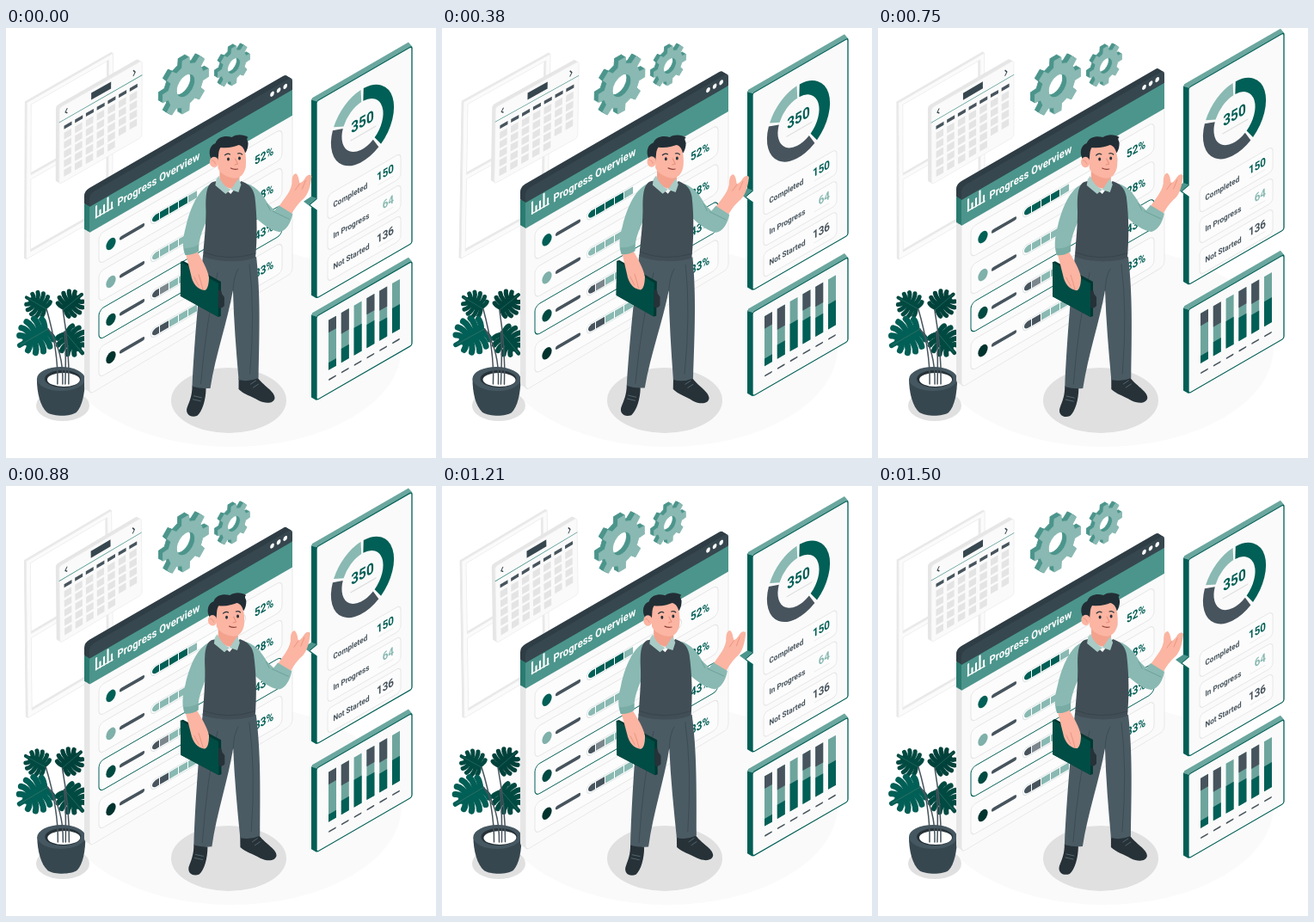
Write an HTML page that moves like this. It is 500 px wide and 500 px high and loops after 1540 ms.

```html
<!DOCTYPE html>
<html lang="en">
<head>
<meta charset="utf-8">
<title>Progress overview</title>
<style>
html, body { margin: 0; width: 100%; height: 100%; overflow: hidden; background: #fff; }
svg { display: block; width: 100%; height: 100%; }
text { font-family: Roboto, "Open Sans", sans-serif; font-weight: 600; }
</style>
</head>
<body>
<script>
const DEEP = '#005f56', MID = '#4c958c', PALE = '#89b9b2', SLATE = '#47545d', INK = '#37474f', SKIN = '#fbb5a2';
const SLANT = Math.tan(Math.PI / 6);
const LOOP = 1540;

// Basic shapes
const path = (d, fill, extra = '') => `<path d="${d}" fill="${fill}" ${extra}/>`;
const line = (d, color, w = 1, extra = '') =>
  `<path d="${d}" fill="none" stroke="${color}" stroke-width="${w}" stroke-linecap="round" stroke-linejoin="round" ${extra}/>`;
const oval = (x, y, rx, ry, fill) => `<ellipse cx="${x}" cy="${y}" rx="${rx}" ry="${ry}" fill="${fill}"/>`;
const rect = (x, y, w, h, fill, r = 0, extra = '') =>
  `<rect x="${x}" y="${y}" width="${w}" height="${h}" rx="${r}" fill="${fill}" ${extra}/>`;
const range = (n, f) => Array.from({ length: n }, (_, i) => f(i)).join('');

// Isometric wall: u runs right along the slope, v is the height at its left edge
const wall = (x, body) => `<g transform="matrix(1 ${-SLANT} 0 1 ${x} 0)">${body}</g>`;
const flat = (u, v, body) => `<g transform="translate(${u} ${v}) scale(.866 1)">${body}</g>`;
const label = (u, v, size, color, str, anchor = 'start') =>
  flat(u, v, `<text font-size="${size}" fill="${color}" text-anchor="${anchor}">${str}</text>`);
const depth = (n, layer) =>
  range(n, i => `<g transform="translate(${i - n} ${(i - n) * 7 / 6})">${layer}</g>`);

// Moving groups
const floating = (rise, body) => `<g data-rise="${rise}">${body}</g>`;
const swaying = (x, y, body) => `<g data-pivot="${x} ${y}">${body}</g>`;

function board() {
  const pane = (c, edge) => path('M0 87H100V269H0Z M5 92V174H95V92Z M5 179V263H95V179Z', c,
    `fill-rule="evenodd" stroke="${edge}" stroke-width=".8"`);
  return wall(24, depth(2, pane('#ececec', '#e6e6e6')) + pane('#fbfbfb', '#ebebeb'));
}

function calendar() {
  const dash = c => (c * 12.7 + 5.5).toFixed(1);
  return wall(62,
    depth(4, rect(0, 93, 96, 89, '#e6e6e6', 3)) +
    rect(0, 93, 96, 89, '#fafafa', 3, 'stroke="#ededed" stroke-width=".7"') +
    line('M0 110H96', MID, .8) +
    rect(37, 97, 23, 8, INK) +
    line('M9 99L7 102L9 104', INK, 1.2) + line('M86 99L88 102L86 105', INK, 1.2) +
    range(7, c => rect(dash(c), 117, 9, 4, SLATE)) +
    range(5, r => range(7, c => (r === 4 && c > 4) ? '' : rect(dash(c), 125 + r * 10.8, 8.5, 8, '#e4e4e4'))));
}

function gear(x, y, R) {
  const pt = (r, a) => `${(r * Math.cos(a)).toFixed(1)} ${(r * Math.sin(a)).toFixed(1)}`;
  const teeth = [];
  for (let i = 0; i < 8; i++) {
    for (const [r, o] of [[.76, -.22], [1, -.15], [1, .15], [.76, .22]]) {
      teeth.push(pt(R * r, i * Math.PI / 4 + o));
    }
  }
  const h = R * .4;
  const d = `M${teeth.join('L')}Z M${h} 0A${h} ${h} 0 1 0 ${-h} 0A${h} ${h} 0 1 0 ${h} 0Z`;
  const body = (dx, color) => `<g transform="matrix(.866 -.5 0 1 ${x + dx} ${y + dx * .58})">` +
    path(d, color, `fill-rule="evenodd" stroke="${color}" stroke-linejoin="round"`) + '</g>';
  const n = Math.round(R / 6);
  return range(n, i => body(i - n, MID)) + body(0, PALE);
}

// Monstera leaf: lobes fan out from the spine with open slits between them
function leaf(x, y, turn, size, color) {
  const lobe = (i, side) => {
    const a = (138 - i * 27) * Math.PI / 180, root = 3 + i * 4;
    const tx = 11 + 14 * Math.cos(a), ty = side * 14 * Math.sin(a);
    return line(`M${root} 0Q${(root + tx) / 2 - 2} ${ty * .7} ${tx} ${ty}`, color, 5);
  };
  return `<g transform="translate(${x} ${y}) rotate(${turn}) scale(${size})">` +
    range(5, i => lobe(i, 1) + lobe(i, -1)) +
    oval(12, 0, 12, 5.5, color) + line('M18 0L27 0', color, 4) + line('M0 0H26', '#2e7067', .6) + '</g>';
}

function plant() {
  const stem = (x, tip) => line(`M${x} 414Q${x + 1} 375 ${tip}`, SLATE, 1.5);
  return leaf(47, 327, -150, 1, '#004a42') + leaf(66, 328, -40, 1.05, '#00423b') +
    leaf(68, 353, 50, 1.2, '#004a42') + leaf(49, 350, 150, 1.42, DEEP) +
    path('M36 408C36 424 40 440 48 447C56 452 75 452 82 447C89 440 92 424 92 408Z', INK) +
    oval(64, 408, 28, 14, '#455761') + oval(66, 408, 21, 10, '#263238') + oval(67, 409, 19, 8, '#fff') +
    stem(60, '47 327') + stem(66, '49 350') + stem(73, '66 328') + stem(69, '68 353');
}

function mainWindow() {
  const shell = (bar, strip, body) =>
    path('M0 237H236V415Q236 421 230 421L5 426Q0 426 0 420Z', body) +
    rect(0, 208, 236, 30, strip) +
    path('M0 208V199Q0 193 6 193H231Q236 193 236 198V208Z', bar);
  const pills = [
    [DEEP, DEEP, DEEP, DEEP, PALE], [PALE, PALE, PALE, PALE, '#dfe7e6'],
    [SLATE, '#7c878d', PALE, PALE, '#dfe7e6'], [SLATE, SLATE, PALE, PALE, PALE]];
  const dots = [DEEP, '#7fb0a9', '#004a42', '#00332e'];
  const row = i => {
    const v = 265.5 + i * 44;
    return rect(11, v - 19, 213, 35, '#fcfcfc', 6, `stroke="${i === 2 ? DEEP : '#e6e6e6'}"`) +
      flat(25, v, `<circle r="6.5" fill="${dots[i]}"/>`) +
      line(`M37 ${v}H62`, SLATE, 4.2) +
      rect(71.5, v - 5.5, 110, 11, '#fff', 5, 'stroke="#dfe5e5"') +
      pills[i].map((c, k) => k
        ? rect(71 + k * 11, v - 4, 10, 8, c)
        : path(`M81 ${v - 4}V${v + 4}H77Q73 ${v + 3} 73 ${v}Q73 ${v - 3} 77 ${v - 4}Z`, c)).join('') +
      label(192, v + 5, 13.6, DEEP, ['52%', '28%', '43%', '33%'][i]);
  };
  const bars = [13, 6, 9, 15, 7];
  return wall(97,
    depth(6, shell('#2f3d45', '#2b7b71', '#e6e6e6')) + shell(INK, MID, '#fafafa') +
    line('M0 239V420Q0 426 5 426L230 421Q236 421 236 415V239', '#e4e4e4', .8) +
    range(3, i => flat(212.5 + i * 7.6, 199.5, '<circle r="2.7" fill="#fff"/>')) +
    line('M7.5 225H27', '#fff', 1.5) +
    bars.map((h, i) => line(`M${8 + i * 4.5} 225V${225 - h}`, '#fff', 2.1)).join('') +
    label(32.5, 226.5, 13.1, '#fff', 'Progress Overview') +
    range(4, row));
}

// Teal framed slab with a lit top edge and dark left edge
function slab(v, h) {
  return wall(361,
    path(`M0 ${v}V${v + h}L-6 ${v + h - 7}V${v - 5}L-4 ${v - 7}Z`, DEEP) +
    path(`M0 ${v}H111L107 ${v - 7}H-4L-6 ${v - 5}Z`, '#6ba79f') +
    rect(0, v, 111, h, '#fafafa', 2.5, `stroke="${DEEP}" stroke-width="1.3"`));
}

function bubble() {
  return slab(85.5, 229) +
    path('M346 202L355 196L361 198V212L354 208Z', MID) +
    path('M353 206L362 199V212Z', '#fafafa') + line('M361 199L353 206L361 212', DEEP, 1);
}

function stats() {
  const arc = (from, to, color) => {
    const p = a => `${(35 * Math.sin(a * Math.PI / 180)).toFixed(2)} ${(-35 * Math.cos(a * Math.PI / 180)).toFixed(2)}`;
    return `<path d="M${p(from)}A35 35 0 0 1 ${p(to)}" fill="none" stroke="${color}" stroke-width="14.5"/>`;
  };
  const cards = [['Completed', 150, DEEP], ['In Progress', 64, PALE], ['Not Started', 136, SLATE]];
  return wall(361,
    flat(53.5, 144, arc(2, 144, DEEP) + arc(149, 289, SLATE) + arc(294, 357, PALE)) +
    label(53.5, 146, 17.8, DEEP, '350', 'middle') +
    line('M40 154H69', '#dedede', 1.3) +
    cards.map(([name, n, color], i) => {
      const v = 202 + i * 36;
      return rect(13, v, 85, 29, '#fcfcfc', 5, 'stroke="#e7e7e7"') +
        label(19.5, v + 18.3, 9.4, SLATE, name) +
        label(90, v + 17, 13.4, color, n, 'end') +
        line(`M72 ${v + 22}H89`, '#ececec', 1);
    }).join(''));
}

function barChart() {
  const splits = [[.25, .85], [.42, .72], [0, .45], [.33, .53], [.4, .62], [0, .5]];
  return slab(335.5, 97.5) + wall(361, splits.map(([a, b], i) => {
    const u = 14 + i * 14.8, y = f => 348 + f * 58;
    return rect(u, 348, 9, 58, '#6da59d') + rect(u, 348, 9, a * 58, SLATE) +
      rect(u, y(b), 9, (1 - b) * 58, DEEP) + line(`M${u + 1} 417.5H${u + 8}`, SLATE, 1.8);
  }).join(''));
}

function man() {
  const shoe = '#263238', vest = '#414e56', pants = '#4b5b64', crease = '#e78f7c';
  return path('M217 416L233 419C233 432 229 446 223 451C215 454 209 449 211 442C214 434 217 428 217 416Z', shoe) +
    path('M271 407L292 405C299 416 313 422 313 430C312 437 302 437 294 433C286 428 277 426 271 420Z', shoe) +
    line('M218 432L227 434M219 428L228 430M285 414L291 410M288 418L294 414', '#607078', .8) +
    path('M229 264C245 273 275 272 291 266C296 310 295 350 294 407Q282 412 271 409C268 375 265 340 264 305C258 340 244 380 238 419Q227 420 217 417C219 370 224 310 229 264Z', pants) +
    line('M264 305Q265 288 270 280M283 275Q290 330 284 402M246 285Q233 340 227 414', '#394850', .8) +
    // Raised arm
    path('M315 210L331 218C334 211 340 203 346 198C351 193 354 183 355 172C353 169 349 171 347 175C345 178 343 180 341 180C340 176 340 172 337 169C333 169 332 174 332 181C331 187 328 192 325 196Z', SKIN) +
    line('M341 181L336 188M348 177L344 187', crease, .8) +
    path('M280 181C292 185 299 195 304 204L312 212L317 206L333 216C331 227 325 236 318 237C308 236 297 227 288 219Z', PALE) +
    line('M310 213L329 222M303 204L307 212', '#6a9f97', .9) +
    // Torso
    path('M239 181C224 186 214 209 209 231C205 245 205 257 208 263Q217 264 224 259C223 246 230 230 238 214Z', PALE) +
    path('M240 179C234 182 232 190 232 206C233 226 230 250 229 266C246 273 276 273 290 267C292 245 292 220 289 196C287 185 281 181 273 178L261 193L244 178Z', vest) +
    line('M230 261Q258 272 290 262', '#35424a', .8) +
    // Neck and collar
    path('M248 164L271 170V183Q263 192 248 180Z', '#f3a28e') +
    path('M247 172L244 176L243 183L255 193L261 188Q251 183 247 172Z', '#a9cbc6') +
    path('M270 175L261 188L270 191L273 182Z', '#a9cbc6') +
    // Head
    path('M238 152C234 144 237 136 243 134C246 126 255 125 262 127C268 123 276 124 281 127C278 129 281 131 281 134C281 138 280 142 278 145L268 143L249 158Z', '#222e35') +
    oval(241.5, 156, 5.2, 6.2, SKIN) + line('M239 154Q242 154 243 158', crease, .8) +
    path('M246 153C247 148 246 143 249 139C258 140 265 138 270 136C275 137 277 142 278 147C279 156 279 163 276 168C273 174 267 176 261 174C254 172 248 168 246 163Z', SKIN) +
    oval(258, 152.5, 1.5, 2, shoe) + oval(271, 151.5, 1.5, 2, shoe) +
    line('M254 148Q257 145 260 147M269 146Q272 145 274 147', shoe, 1.2) +
    line('M266 152L269 158L265.5 159', crease, 1) + line('M261 163Q265 165 269 164', '#8d3f38', 1.2) +
    // Clipboard and hand
    path('M203 272L206 271L250 295V335L247 336L203 312Z', '#003832') +
    path('M203 272L247 297V336L203 312Z', '#004d45') +
    path('M247 305Q251 304 251 309L254 313V323Q251 327 247 325Z', '#263238') +
    path('M209 263Q217 264 222 260C228 270 234 280 236 290C236 301 233 306 230 305C223 304 217 298 215 287Z', SKIN) +
    line('M224 287Q227 296 229 304M219 290L224 300', crease, .8) +
    path('M207 256Q216 257 224 252V260Q216 265 208 264Z', '#78aca4');
}

document.body.innerHTML = `<svg viewBox="0 0 500 500" xmlns="http://www.w3.org/2000/svg">` +
  oval(262, 371, 198, 116, '#fafafa') +
  oval(259, 433, 67, 38, '#e0e0e0') + oval(66, 439, 31, 18, '#e0e0e0') +
  swaying(74, 150, board()) + swaying(108, 110, calendar()) +
  swaying(207, 67, gear(209, 67, 31)) + swaying(263, 44, gear(265, 44, 21.5)) +
  swaying(63, 382, plant()) +
  floating(8, mainWindow()) +
  floating(16, bubble()) + floating(8, stats()) + floating(8, barChart()) +
  swaying(270, 288, man()) + '</svg>';

const floats = [...document.querySelectorAll('[data-rise]')];
const sways = [...document.querySelectorAll('[data-pivot]')];
const start = performance.now();

function draw() {
  const t = (performance.now() - start) % LOOP;
  const phase = (t + 50) / LOOP * 2 * Math.PI;
  const lift = (Math.cos(phase) - 1) / 2;
  for (const el of floats) el.setAttribute('transform', `translate(0 ${(el.dataset.rise * lift).toFixed(3)})`);
  for (const el of sways) el.setAttribute('transform', `rotate(${Math.sin(phase).toFixed(4)} ${el.dataset.pivot})`);
  requestAnimationFrame(draw);
}
draw();
</script>
</body>
</html>
```
